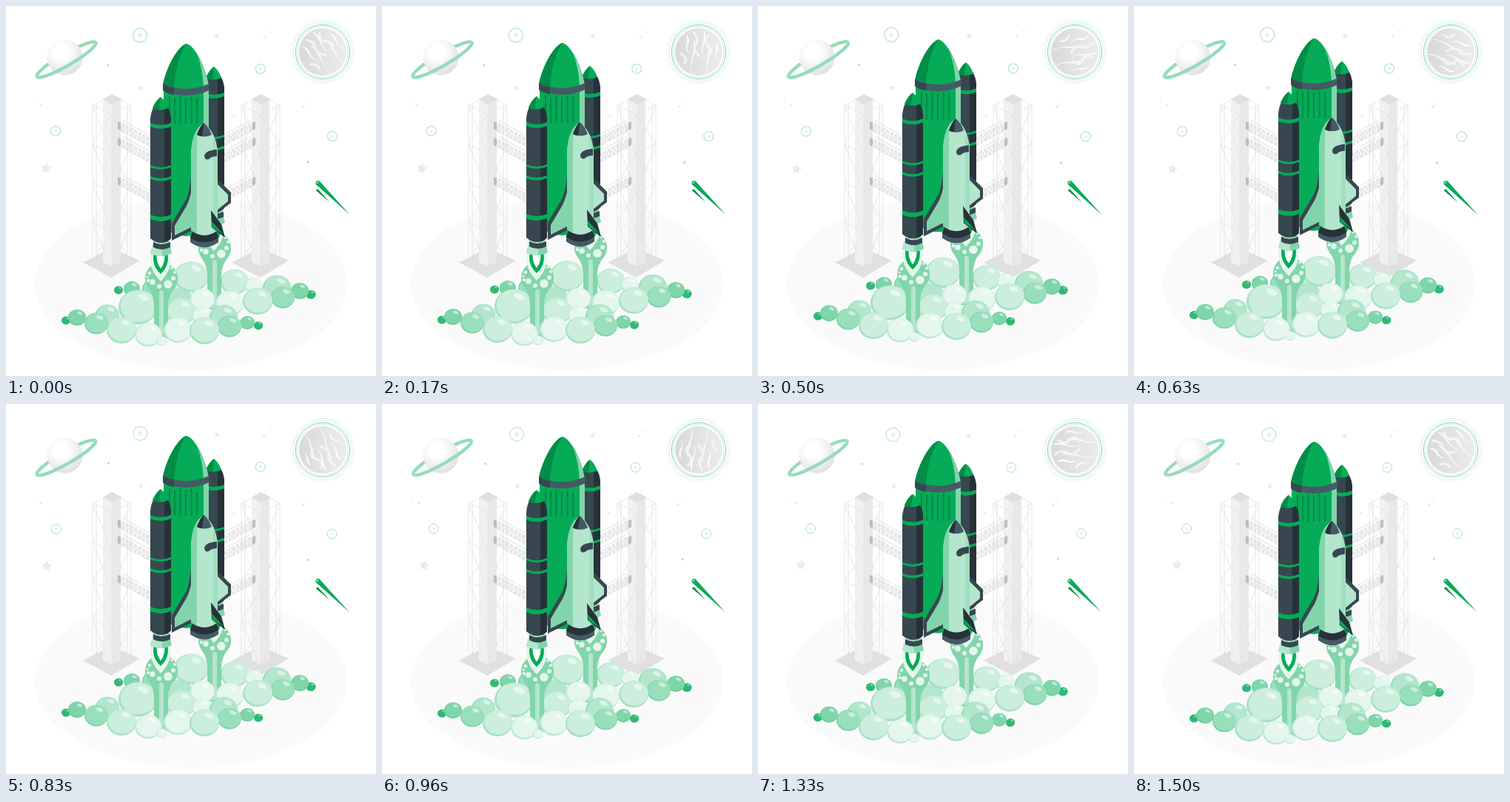
These frames come from a looping animation (500 px wide and 500 px high, 1540 ms). An HTML page:

```html
<!DOCTYPE html>
<html lang="en">
<head>
<meta charset="utf-8">
<title>Rocket launch</title>
<style>
  html, body { margin: 0; height: 100%; overflow: hidden; background: #fff; }
  svg { display: block; width: 100%; height: 100%; }
</style>
</head>
<body>
<svg id="stage" viewBox="0 0 500 500"></svg>
<script>
const LOOP = 1540;
const GREEN = '#05ab57', DEEP = '#008d47', MID = '#82d5ab', MINT = '#b4e6cd', PALE = '#e4f6ed';
const NAVY = '#37474f', INK = '#263238', GREY = '#e0e0e0';

const path = (d, fill, extra = '') => `<path d="${d}" fill="${fill}" ${extra}/>`;
const line = (d, color, width = 1) => path(d, 'none', `stroke="${color}" stroke-width="${width}"`);
const ellipse = (x, y, rx, ry, fill, extra = '') =>
  `<ellipse cx="${x}" cy="${y}" rx="${rx}" ry="${ry}" fill="${fill}" ${extra}/>`;
const dot = (x, y, r, fill, extra) => ellipse(x, y, r, r, fill, extra);
const ring = (x, y, r, color, width = 1) => dot(x, y, r, 'none', `stroke="${color}" stroke-width="${width}"`);
const group = (content, attrs = '') => `<g ${attrs}>${content}</g>`;
const at = (x, y, content) => group(content, `transform="translate(${x} ${y})"`);

// A strip wrapped around a cylinder
const band = (x0, x1, y, h, sag, fill) => {
  const mid = (x0 + x1) / 2;
  return path(`M${x0} ${y}Q${mid} ${y + sag * 2} ${x1} ${y}V${y + h}Q${mid} ${y + h + sag * 2} ${x0} ${y + h}Z`, fill);
};

function star(x, y, r) {
  let d = '';
  for (let i = 0; i < 10; i++) {
    const a = i * Math.PI / 5 - 1.4, q = i % 2 ? r * 0.5 : r;
    d += `${i ? 'L' : 'M'}${x + q * Math.cos(a)} ${y + q * Math.sin(a)}`;
  }
  return path(d + 'Z', '#ebebeb');
}

function sky() {
  const orb = (x, y, r) => ring(x, y, r, '#a5dfc4') + dot(x, y, r * 0.3, '#e3f3eb');
  const specks = [[358, 35], [349, 42], [38, 129], [47, 134], [407, 132], [402, 136]];
  return orb(181, 39.5, 9.5) + orb(344, 85, 6.5) + orb(67, 169, 6.5) + orb(441, 176, 6.5)
    + star(285, 41, 4.3) + star(182, 111, 4.3) + star(54, 219.5, 7.5) + star(308, 148, 2.6)
    + specks.map(([x, y], i) => dot(x, y, i % 2 ? 1.6 : 1, '#e6e6e6')).join('')
    + dot(138, 80, 1.3, '#c4c4c4') + dot(408.5, 211, 1.5, '#c8c8c8');
}

function saturn() {
  const halo = half => group(line(`M-46 0A46 8 0 0 ${half} 46 0`, '#95dcba', 4.5),
    'class="halo" data-at="81.5 72.5"');
  return halo(1) + dot(79.5, 69.5, 24, 'url(#ball)') + halo(0);
}

function planet() {
  const stripes = [[-19, -7, 12, 5], [-8, 9, 24, 4], [3, -11, 18, 4], [12, 8, 21, 5], [22, -4, 12, 4]]
    .map(([x, y, h, w], i) =>
      path(`M${x} ${y - h}q${w} ${h * 0.4} ${w - 2} ${h}t${w} ${h}q${-w * 1.6} ${-h * 0.3} ${-w * 1.4} ${-h}t${2 - w} ${-h}`,
        i % 2 ? '#f8f8f8' : '#fff')).join('')
    + line('M-12 -26q10 9 6 17t9 15M9 -25q-6 12 3 16t0 14M-24 6q11 4 8 13', '#f4f4f4', 3);
  return ring(428, 62, 42.5, '#d9f2e6', 0.7) + ring(428, 62, 40, '#c9ecda', 0.7) + ring(428, 62, 36.7, '#87d3ae')
    + ring(428, 62, 34.5, '#b4e3cc', 0.7) + dot(428, 62, 32, 'url(#disc)')
    + at(428, 62, group(group(stripes, 'id="spin" transform="rotate(-30)"'), 'clip-path="url(#round)"'));
}

const comet = () => group(
  path('M-2.8 2L2.5 -2L43 43Z', GREEN) + dot(0, 0, 3, GREEN) + dot(-0.5, -0.5, 1.3, MINT)
  + path('M-3 10L0 8.5L16 26Z', DEEP), 'id="comet"');

function tower() {
  let frame = 'M117 134V348M122 131V342M143 148V362M164 131V342M169 134V348M117 134L143 121L169 134';
  for (let y = 134; y < 300; y += 52.5) {
    frame += `M117 ${y}l26 13l26 -13M117 ${y}l26 65.5l26 -65.5M143 ${y + 13}l-26 39.5M143 ${y + 13}l26 39.5`;
  }
  return path('M104 346.5L142.500 327L181 344L142.500 367Z', GREY)
    + path('M131 126L143 132V352L131 346Z', '#f1f1f1') + path('M155 126L143 132V352L155 346Z', '#e9e9e9')
    + path('M131 126L143 119L157 126L143 133Z', '#dedede') + line(frame, '#e2e2e2', 0.8);
}

function arms() {
  const arm = y => {
    let web = `M153 ${y - 5}l44 24M153 ${y + 6}l44 24M157 ${y - 7}l40 22`;
    for (let i = 0; i < 8; i++) web += `M${153 + i * 5.5} ${y - 5 + i * 3}l5.500 14v-11l-5.500 8`;
    return line(web, '#dcdcdc', 0.9) + path(`M151 ${y - 5}l4 2v10l-4 -2Z`, '#bdbdbd');
  };
  return arm(161) + arm(183) + arm(236);
}

// Boosters and plumes are drawn from the tip of the nose cone
function plume() {
  const foam = [[-17, 248, 2.2], [-11, 250, 3.8], [-2, 256, 3], [10, 253, 5.8], [17, 245, 3],
    [19, 237, 2], [-15, 238, 2.2], [-18, 243, 1.5], [15, 231, 1.8]];
  return path('M-9 326V282Q-9 268 -17 258A22 22 0 1 1 19 258Q10 268 10 282V326Q0 331 -9 326Z', MID)
    + path('M-2 327V263Q1 259 4 263V327Z', MINT)
    + foam.map(([x, y, r]) => dot(x, y, r, PALE)).join('')
    + path('M-13 212Q-17 232 0 249Q17 232 13 212Z', PALE)
    + path('M-9 210Q-13 227 0 239Q13 227 9 210Z', GREEN)
    + path('M-5 210Q-7 223 0 232Q7 223 5 210Z', '#fff');
}

function booster() {
  const bands = [[35, 5], [92, 3], [107, 3.5], [159, 6]];
  return path('M-9 193H11L15 211Q0 219 -14 211Z', MID) + path('M-9 193H2V215Q-8 215 -14 211Z', MINT)
    + band(-10, 13, 196, 7, 3, NAVY)
    + path('M-14 30Q-13 19 -9 13H9Q13 19 14 30V191Q0 203 -14 191Z', NAVY)
    + path('M5 14H9Q13 19 14 30V191Q10 196 5 196Z', INK)
    + path('M0 0Q6 4 10 15Q0 20 -11 15Q-6 4 0 0Z', GREEN) + path('M0 0Q-6 4 -11 15Q-6 18 -2 17Z', DEEP)
    + bands.map(([y, h]) => band(-14, 14, y, h, 3, GREEN)).join('');
}

function tank() {
  const ribs = [221, 228, 235.5, 243, 250.5, 258].map((x, i) => `M${x} ${122 + i % 2 * 2}V${i ? 159 : 153}`).join('');
  return path('M213 111H274V300Q243 322 213 300Z', GREEN)
    + path('M267 114L274 111V300L267 306Z', MID) + line(ribs, DEEP, 2.2)
    + path('M244 51C232 54 216 84 212 107Q243 122 274 107C270 84 256 54 244 51Z', GREEN)
    + path('M244 51C232 54 216 84 212 107Q219 112 227 113C228 88 235 62 244 51Z', DEEP)
    + path('M258 66Q270 85 274 107Q271 110 267 111Q266 83 258 66Z', MID)
    + band(212, 274.5, 105, 9, 7, '#455a64') + path('M212 105Q219 110 227 111V120Q218 119 212 114Z', NAVY);
}

function shuttle() {
  return path('M251 212Q250 248 243 262L224 294V317L254 302Z', NAVY)
    + path('M252 243Q249 260 244 270L228 297V310L254 297Z', MID)
    + path('M285 233L304 252V266L284 281Z', NAVY) + path('M285 240L300 255V264L285 276Z', MINT)
    + path('M249 312L253 303H284L287 312V319Q268 333 249 319Z', INK)
    + path('M249 313Q268 326 287 313V319Q268 333 249 319Z', '#455a64')
    + path('M250 200Q251 168 267.500 158Q284 171 286 198V303Q268 317 250 303Z', MINT)
    + path('M250 200Q251 176 259 166Q257 185 258 308L250 303Z', MID)
    + path('M280 178Q285 188 286 198V303L280 307Z', '#9fdfc0')
    + path('M267.500 158Q274 163 278 174Q268 179 258 174Q262 162 267.500 158Z', '#455a64')
    + path('M267.500 158Q262 162 258 174Q261 176 265 176Z', INK)
    + path('M285 194V203Q278 203 274 207Q268 209 268 202Q270 195 285 194Z', NAVY)
    + path('M277 276L291 295L296 313L278 299Z', INK) + path('M278 291L294 309L279 299Z', GREEN);
}

const TONES = ['#e4f6ed', '#cbeedd', '#b3e6cd', '#9adfbd', '#7fd5aa', '#30b974'];
const smoke = puffs => puffs.map(([x, y, r, tone]) => {
  const h = r * 0.9;
  return ellipse(x, y, r, h, TONES[tone]) + ellipse(x, y, r, h, GREEN, 'opacity=".18"')
    + ellipse(x + r * 0.05, y - r * 0.06, r * 0.94, h * 0.92, TONES[tone])
    + ellipse(x + r * 0.3, y - h * 0.56, r * 0.3, h * 0.18, '#fff',
      `opacity=".5" transform="rotate(22 ${x + r * 0.3} ${y - h * 0.56})"`);
}).join('');

const backSmoke = [[201, 383, 17, 3], [226, 389, 23, 2], [250, 366, 23, 1], [309, 373, 19, 1], [152, 384, 6, 5],
  [170, 382, 11, 4], [335, 378, 12, 0], [366, 381, 19, 2], [412, 390, 6.5, 5], [397, 385, 12, 4]];
const midSmoke = [[265, 397, 17, 0], [302, 402, 19, 0], [374, 394, 16, 3], [340, 399, 20, 1], [137, 418, 16, 2],
  [178, 407, 26, 1], [236, 413, 20, 1], [81, 425, 6, 5], [96, 421, 12, 4], [122, 429, 16, 3], [156, 438, 20, 1]];
const frontSmoke = [[265, 419, 14, 0], [294, 421, 19, 2], [232, 438, 19, 0], [192, 444, 18, 0], [341, 432, 6, 5],
  [326, 428, 10, 4], [302, 433, 16, 3], [268, 439, 20, 1], [211, 453, 7, 0]];

document.getElementById('stage').innerHTML = `
  <defs>
    <radialGradient id="ball" cx=".4" cy=".35" r=".7"><stop offset=".3" stop-color="#fff"/><stop offset="1" stop-color="#dedede"/></radialGradient>
    <linearGradient id="disc"><stop offset="0" stop-color="#d9d9d9"/><stop offset="1" stop-color="#ececec"/></linearGradient>
    <clipPath id="round"><circle r="32"/></clipPath>
  </defs>`
  + ellipse(250, 375, 211, 117, '#fafafa')
  + group(sky(), 'id="sky"') + saturn() + planet() + comet()
  + tower() + at(201, 0, tower()) + arms() + group(arms(), 'transform="translate(488) scale(-1 1)"')
  + group(smoke(backSmoke) + at(281, 82, plume()) + smoke(midSmoke) + at(209, 123, plume()) + smoke(frontSmoke)
    + at(281, 82, booster()) + tank() + at(209, 123, booster()) + shuttle(), 'id="rocket"');

const move = (el, value) => el.setAttribute('transform', value);
const [skyEl, cometEl, spinEl, rocketEl] = ['sky', 'comet', 'spin', 'rocket'].map(id => document.getElementById(id));
const halos = document.querySelectorAll('.halo');

const ease = (t, start, end) => {
  const p = Math.min(1, Math.max(0, (t - start) / (end - start)));
  return (1 - Math.cos(Math.PI * p)) / 2;
};

function render(now) {
  const t = now % LOOP, turn = t / LOOP;
  // The sky swells, shrinks, holds, then snaps back at the loop
  const zoom = 1 + 0.0107 * ease(t, 0, 590) - 0.0321 * ease(t, 590, 1110);
  move(rocketEl, `translate(0 ${-4 * (1 - Math.cos(2 * Math.PI * turn))})`);
  move(skyEl, `translate(254 130) scale(${zoom}) translate(-254 -130)`);
  move(cometEl, `translate(421.500 239) scale(${zoom})`);
  halos.forEach(el => move(el, `translate(${el.dataset.at}) rotate(-30) scale(${zoom})`));
  move(spinEl, `rotate(${360 * turn - 30})`);
  requestAnimationFrame(render);
}
render(performance.now());
</script>
</body>
</html>
```
